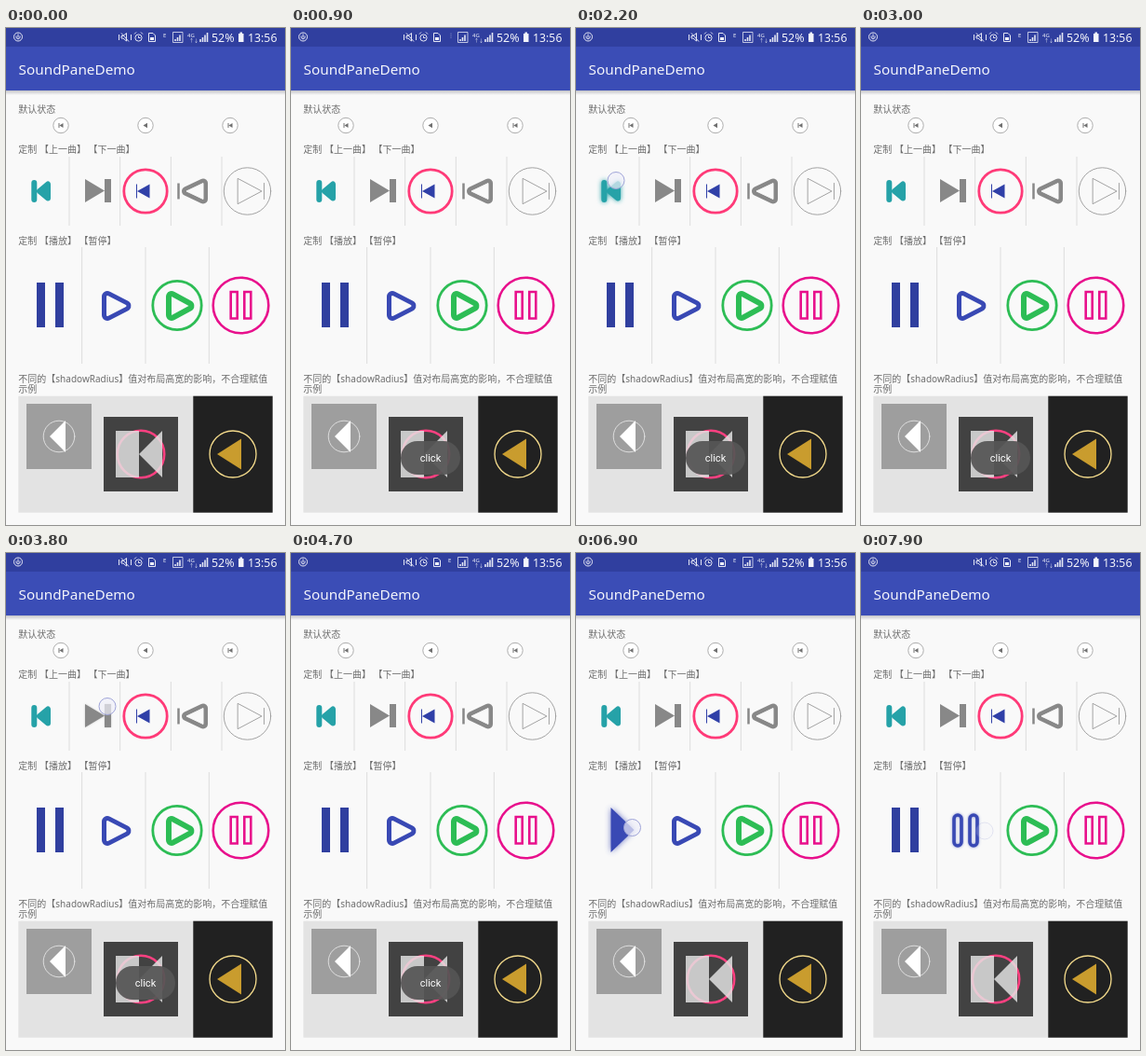
An HTML page that plays this animation: 300 by 533 pixels, repeating every 8 s.

```html
<!DOCTYPE html>
<html lang="zh">
<head>
<meta charset="utf-8">
<style>
  html, body { margin: 0; width: 100%; height: 100%; overflow: hidden; background: #f9f9f9; }
  svg { display: block; width: 100vw; height: 100vh; }
  text { font-family: 'Noto Sans', 'Noto Sans CJK SC', 'Noto Sans CJK', sans-serif; }
  .labels { font-size: 10px; fill: #6c6c6c; }
  .line { fill: none; stroke-linejoin: round; stroke-linecap: round; }
  .soft { stroke-linejoin: round; }
</style>
</head>
<body>
<svg viewBox="0 0 300 533" preserveAspectRatio="none">
  <defs>
    <linearGradient id="drop" x2="0" y2="1">
      <stop stop-color="#c4c4c8"/><stop offset="1" stop-color="#f9f9f9"/>
    </linearGradient>
    <filter id="blur" x="-150%" y="-150%" width="400%" height="400%">
      <feGaussianBlur id="blurSize" stdDeviation="4"/>
    </filter>

    <g id="prev" fill="#26a2a8" stroke="#26a2a8" stroke-width="6" stroke-linejoin="round" stroke-linecap="round">
      <path d="M30.300 166V184"/><path d="M36 175L45 167.500V182.500Z"/>
    </g>
    <path id="next" fill="#888" d="M85 162L106 174.500 85 187ZM106 162h7v25h-7Z"/>
    <path id="solidPause" fill="#303f9f" d="M33 273h9v48h-9ZM53 273h9v48h-9Z"/>
    <path id="solidPlay" fill="#3949b4" d="M37.500 273L62.500 297 37.500 321Z"/>
    <!-- Rounded outlines: a fat triangle with a lighter one on top. -->
    <g id="roundPlay" class="soft">
      <path id="playCore" fill="#3949b4" stroke="#3949b4" stroke-width="12" d="M109 288V308L128.500 298Z"/>
      <path fill="#f9f9f9" stroke="#f9f9f9" stroke-width="2" d="M109 288V308L128.500 298Z"/>
    </g>
    <g id="roundPause" class="line" stroke="#3949b4" stroke-width="3.600">
      <rect x="100" y="281" width="8" height="33" rx="4"/><rect x="117" y="281" width="8" height="33" rx="4"/>
    </g>
  </defs>

  <rect width="300" height="533" fill="#f9f9f9"/>
  <rect y="67" width="300" height="5" fill="url(#drop)"/>
  <rect width="300" height="67" fill="#3b4db6"/>
  <rect width="300" height="20" fill="#303f9f"/>

  <g fill="none" stroke="#e4e6f4">
    <circle cx="13" cy="9.500" r="4.500"/><path d="M11 8.500v2q2 3 4 0v-2M13 6.500v4"/>
    <path d="M124 8.500h2l3.500-3v8.500l-3.500-3h-2ZM124 5.500l8 9M121.500 7v6M134.500 7v6"/>
    <circle cx="142.500" cy="10.500" r="3.600"/><path d="M142.500 8.500v2h2M138 6.500l2-2M147 6.500l-2-2"/>
    <path d="M153.500 14.500v-9h4.500l2.500 2.500v6.500Z"/>
    <path stroke-width=".8" d="M179.500 4.500h10.500v11h-10.500Z"/>
    <path stroke-width="1.600" d="M182 14v-2M184.500 14v-4M187 14V7.500M209 15v-3M211.500 15v-5M214 15V7.500M216.500 15V5"/>
  </g>
  <g fill="#f4f5fb">
    <path d="M155 13v-3h4v3ZM250 6h1.500V4.500h2.500V6h1.500v9h-5.500Z"/>
    <text id="network" x="169" y="10" font-size="6">E</text>
    <text x="195" y="10" font-size="6">4G</text>
    <text x="197" y="15" font-size="5">↑↓</text>
    <text x="221" y="14.500" font-size="12.400">52%</text>
    <text x="260" y="14.500" font-size="12.300">13:56</text>
    <text x="13.600" y="50" font-size="15.300">SoundPaneDemo</text>
  </g>

  <g class="labels">
    <text x="13.330" y="91">默认状态</text>
    <text x="13.330" y="134">定制 【上一曲】 【下一曲】</text>
    <text x="13.330" y="232">定制 【播放】 【暂停】</text>
    <text x="13.330" y="379.500">不同的【shadowRadius】值对布局高宽的影响，不合理赋值</text>
    <text x="13.330" y="391">示例</text>
  </g>

  <g fill="#fff" stroke="#999" stroke-width=".8">
    <circle cx="59" cy="104.500" r="8.200"/><circle cx="150" cy="104.500" r="8.200"/><circle cx="241" cy="104.500" r="8.200"/>
  </g>
  <path fill="#707070" d="M56.500 102h1v5h-1ZM57.500 104.500l4-2.500v5ZM147.500 104.500l4.500-2.700v5.400ZM238.500 102h1v5h-1ZM239.500 104.500l4-2.500v5Z"/>

  <path stroke="#ddd" d="M68 138v74M122.670 138v74M177.330 138v74M232 138v74M81.670 235v125M150 235v125M218.330 235v125"/>

  <use id="shadow" filter="url(#blur)"/>
  <use href="#prev"/>
  <use href="#next"/>
  <circle class="line" cx="150" cy="175" r="23.200" stroke="#ff3a78" stroke-width="2.800"/>
  <path fill="#3040a8" d="M140 167.500h1v15h-1ZM141 175l13.500-7.500v15Z"/>
  <path stroke="#888" stroke-width="2.500" d="M185.500 166.500v17"/>
  <g class="soft">
    <path fill="#888" stroke="#888" stroke-width="10" d="M194 175L212 166.500V183.500Z"/>
    <path fill="#f9f9f9" stroke="#f9f9f9" d="M194 175L212 166.500V183.500Z"/>
  </g>
  <g class="line" stroke="#999" stroke-width=".9">
    <circle cx="259.500" cy="175" r="25.200"/><path d="M249.500 161.500L275 175 249.500 188.500ZM277.500 166.500v17"/>
  </g>

  <use id="first"/>
  <use id="second"/>
  <circle class="line" cx="184" cy="297.500" r="26.200" stroke="#2dbd55" stroke-width="2.800"/>
  <g class="soft">
    <path fill="#2dbd55" stroke="#2dbd55" stroke-width="12" d="M178 288V308L196.500 298Z"/>
    <path fill="#f9f9f9" d="M178 288V308L196.500 298Z"/>
  </g>
  <g fill="none" stroke="#e8108c" stroke-width="2.600">
    <circle cx="252.500" cy="297.500" r="29.800"/><path d="M241.700 283h7v28.500h-7ZM256.300 283h7v28.500h-7Z"/>
  </g>

  <rect x="13.330" y="394.700" width="273.340" height="125" fill="#e3e3e3"/>
  <rect x="22" y="403" width="70" height="70" fill="#9e9e9e"/>
  <circle class="line" cx="57" cy="438" r="16.800" stroke="#eee" stroke-width=".8"/>
  <path fill="#fff" d="M47 438l17-17v34Z"/>
  <rect x="105" y="417" width="80" height="80" fill="#424242"/>
  <circle class="line" cx="145" cy="457" r="25.200" stroke="#ff4081" stroke-width="2.600"/>
  <path fill="#e6e6e6" fill-opacity=".82" d="M118 432h25v50h-25ZM143 457l25-25v50Z"/>
  <rect x="201.300" y="394.700" width="85.370" height="125" fill="#212121"/>
  <circle class="line" cx="244" cy="457" r="25" stroke="#f5dc8c" stroke-width="1.300"/>
  <path fill="#c99c2e" d="M227 457l26-16.500v33Z"/>

  <circle id="touch" r="9" fill="#f0f0fa" fill-opacity=".7" stroke="#9fa4d8" stroke-width="1"/>
  <g id="toast">
    <rect x="118" y="443" width="64" height="36" rx="18" fill="#555" fill-opacity=".93"/>
    <text x="150" y="465" text-anchor="middle" font-size="11" fill="#fff" style="font-family:Roboto,sans-serif">click</text>
  </g>
</svg>
<script>
const LOOP = 8000;
const el = id => document.getElementById(id);
const clamp = v => Math.max(0, Math.min(1, v));
const ramp = (t, from, length) => clamp((t - from) / length);

// Each press swells the icon's shadow until the finger lifts.
const presses = [
  { x: 43, y: 163.5, down: 2000, up: 2350, blur: 3, icon: () => 'prev' },
  { x: 109, y: 164.5, down: 3740, up: 4050, blur: 3, icon: () => 'next' },
  { x: 64.5, y: 296.5, down: 5250, up: 5650, blur: 8.5, icon: firstIcon },
  { x: 60.5, y: 294.5, down: 6790, up: 7150, blur: 7, icon: firstIcon },
  { x: 133, y: 298, down: 7450, up: 7740, blur: 4, icon: secondIcon }
];

function firstIcon(t) { return t >= 5500 && t < 7150 ? 'solidPlay' : 'solidPause'; }
function secondIcon(t) { return t >= 7740 ? 'roundPause' : 'roundPlay'; }
function setIcon(id, icon) { el(id).setAttribute('href', '#' + icon); }

function draw(t) {
  setIcon('first', firstIcon(t));
  setIcon('second', secondIcon(t));
  el('toast').setAttribute('opacity', Math.min(ramp(t, 600, 250), 1 - ramp(t, 4700, 300)));
  el('network').textContent = t >= 700 && t < 1700 ? '⋮' : 'E';

  const press = presses.find(p => t >= p.down && t < p.up + 220);
  el('touch').setAttribute('opacity', 0);
  el('shadow').setAttribute('opacity', 0);
  if (!press) return;
  const fade = 1 - ramp(t, press.up, 220);
  const level = Math.min(ramp(t, press.down, 300), fade);
  el('touch').setAttribute('cx', press.x);
  el('touch').setAttribute('cy', press.y);
  el('touch').setAttribute('opacity', Math.min(ramp(t, press.down, 60), fade));
  setIcon('shadow', press.icon(t));
  el('shadow').setAttribute('opacity', clamp(level * 2));
  el('blurSize').setAttribute('stdDeviation', 0.5 + press.blur * level);
}

const start = performance.now();
function tick() {
  draw((performance.now() - start) % LOOP);
  requestAnimationFrame(tick);
}
tick();
</script>
</body>
</html>
```
